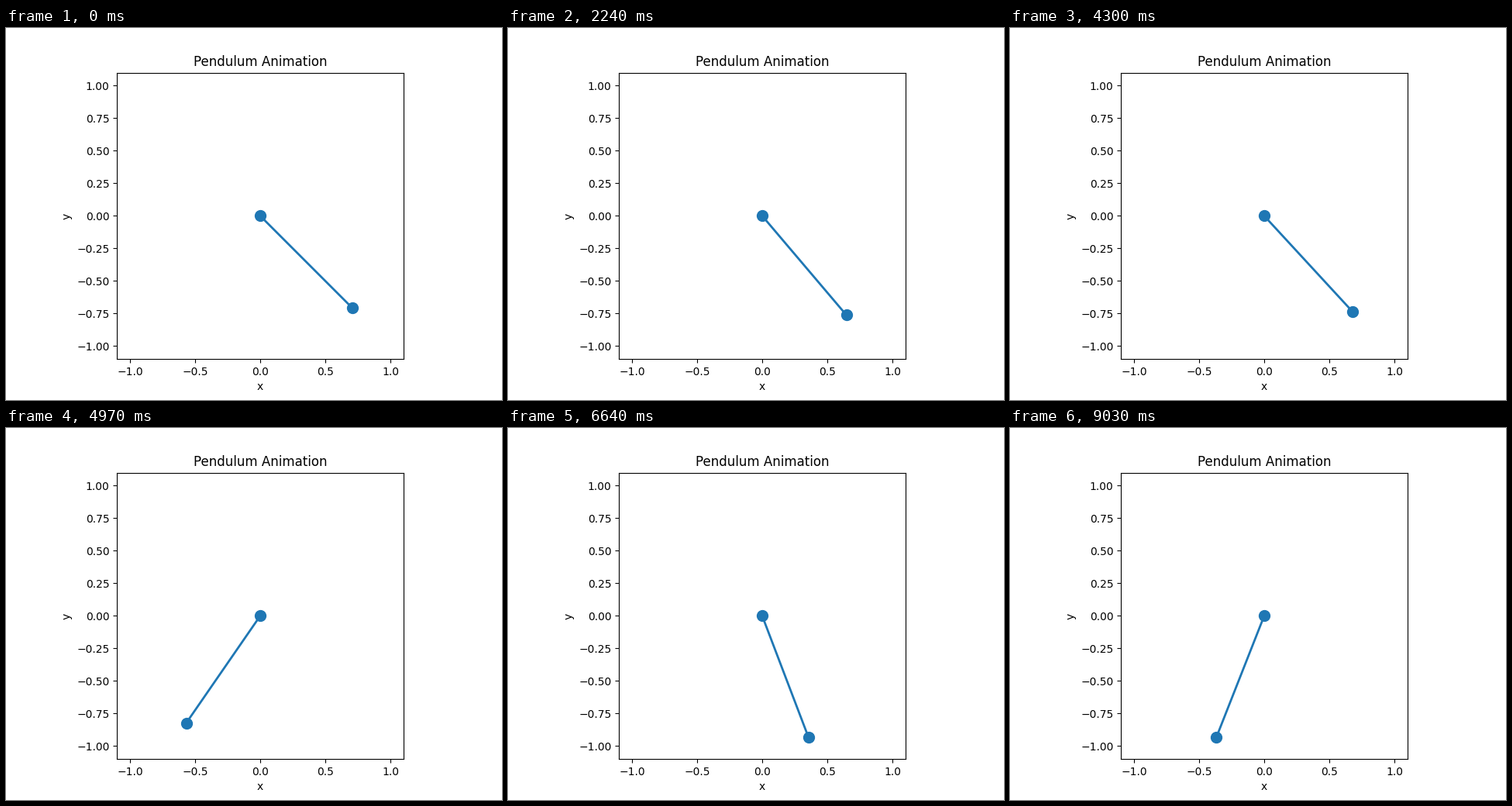
These frames come from a looping animation (640 by 480 pixels, 9060 ms). A matplotlib script:

```python
import numpy as np
import matplotlib.pyplot as plt
from matplotlib.animation import FuncAnimation

G, LENGTH = 9.81, 1.0
START = np.pi / 4
LOOP, INTERVAL = 9060, 15
STEPS = 271
DT = 10 / 299
LEAD = 0.55  # part of a step by which the picture runs ahead


def slope(state):
    theta, omega = state
    return np.array([omega, -G / LENGTH * np.sin(theta)])


def rk4(state, h):
    k1 = slope(state)
    k2 = slope(state + h / 2 * k1)
    k3 = slope(state + h / 2 * k2)
    k4 = slope(state + h * k3)
    return state + h / 6 * (k1 + 2 * k2 + 2 * k3 + k4)


def swing(substeps=4):
    """Angle of the pendulum at every step, released from rest."""
    state = np.array([START, 0.0])
    angles = [START]
    for _ in range(STEPS - 1):
        for _ in range(substeps):
            state = rk4(state, DT / substeps)
        angles.append(state[0])
    return np.array(angles)


theta = swing()
xs, ys = LENGTH * np.sin(theta), -LENGTH * np.cos(theta)

fig, ax = plt.subplots(figsize=(6.4, 4.8), dpi=100)
ax.set_xlim(-1.1, 1.1)
ax.set_ylim(-1.1, 1.1)
ax.set_aspect("equal")
ax.set_title("Pendulum Animation", y=1.0)
ax.set_xlabel("x")
ax.set_ylabel("y")
rod, = ax.plot([], [], "o-", color="tab:blue", lw=2, markersize=10)


def update(i):
    seconds = i * INTERVAL / 1000
    k = min(int(seconds / DT + LEAD), STEPS - 1)
    rod.set_data([0, xs[k]], [0, ys[k]])
    return rod,


anim = FuncAnimation(fig, update, frames=LOOP // INTERVAL, interval=INTERVAL,
                     repeat=True, repeat_delay=0)
plt.show()
```
